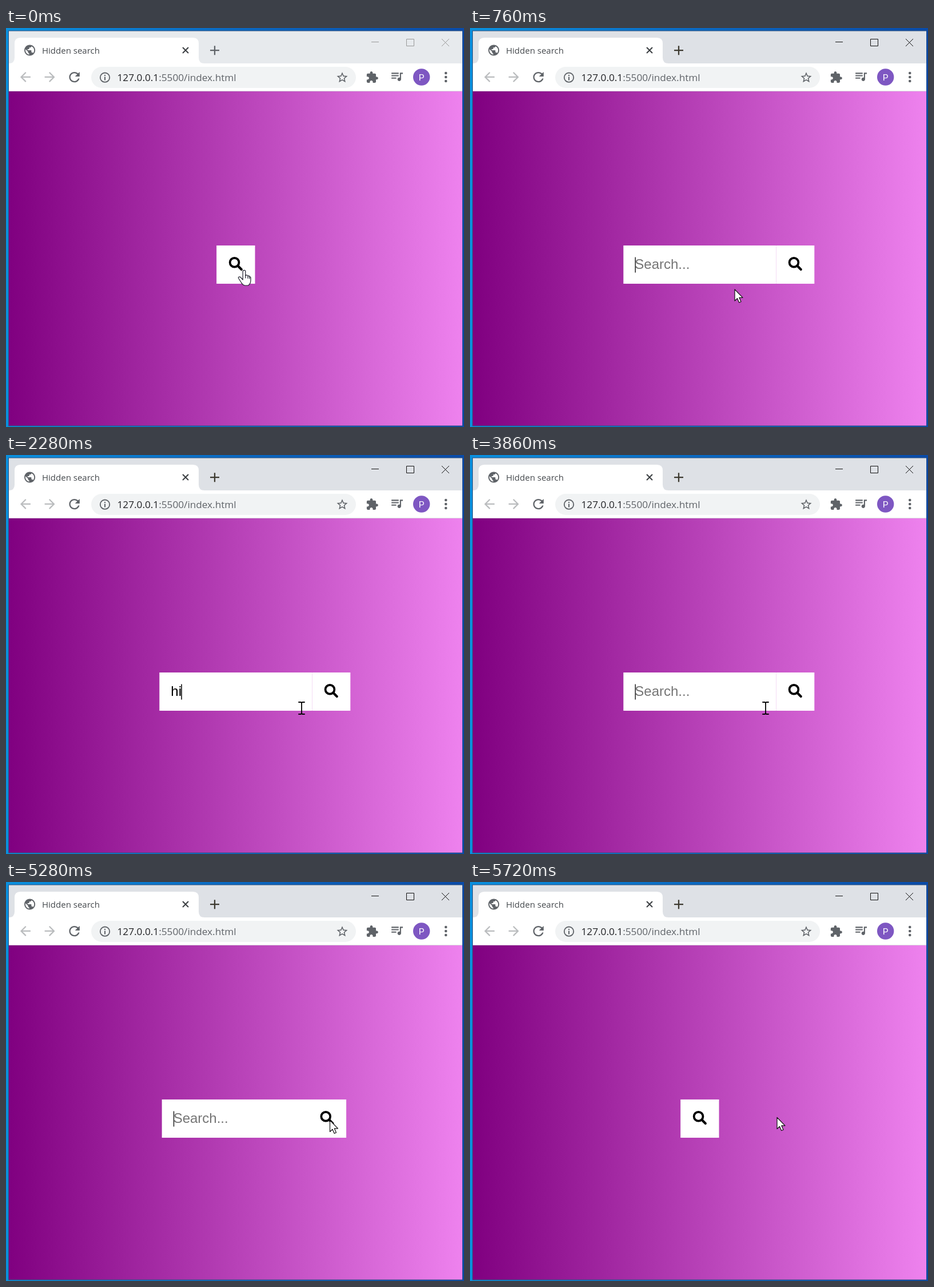
These frames come from a looping animation (801 px wide and 699 px high, 5.77 s). An HTML page:

```html
<!DOCTYPE html>
<html lang="en">
<head>
<meta charset="utf-8">
<title>Hidden search</title>
<style>
  html, body { margin: 0; width: 100%; height: 100%; overflow: hidden; }
  #stage { display: block; width: 100%; height: 100%; --strip: #dee1e6; --control: #111; --plus: #3d3a30; }
  #stage.idle { --strip: #e7eaed; --control: #999; --plus: #5f6368; }
  .ui { font-family: "Open Sans", "Noto Sans", sans-serif; }
  .icon { fill: #5f6368; }
  .dim { fill: #babcbe; }
  .line { fill: none; }
  #field text { font: 24px "Liberation Sans", Arial, sans-serif; white-space: pre; }
  #cursor path { stroke-linejoin: round; stroke-linecap: round; }
</style>
</head>
<body>
<svg id="stage" viewBox="0 0 801 699" preserveAspectRatio="none">
  <defs>
    <linearGradient id="page"><stop stop-color="#800080"/><stop offset="1" stop-color="#ee82ee"/></linearGradient>
    <linearGradient id="desktop"><stop stop-color="#0a90de"/><stop offset=".5" stop-color="#0b68c0"/><stop offset="1" stop-color="#0a4ba8"/></linearGradient>
  </defs>

  <!-- desktop and window -->
  <rect width="801" height="699" fill="url(#desktop)"/>
  <rect x="4" y="4.5" width="794.5" height="693" fill="#31517c"/>
  <rect x="5" y="5.5" width="793" height="57" fill="var(--strip)"/>
  <rect x="5" y="62" width="793" height="49" fill="#fff"/>
  <rect x="5" y="110" width="793" height="1" fill="#dcdee0"/>
  <rect x="5" y="111" width="793" height="585.5" fill="url(#page)"/>

  <!-- tab strip -->
  <path d="M5 62Q15 62 15 52V27Q15 17 25 17H327Q337 17 337 27V52Q337 62 347 62Z" fill="#fff"/>
  <path class="icon" transform="translate(30.2 27.6) scale(.95)" d="M12 2C6.48 2 2 6.48 2 12s4.48 10 10 10 10-4.48 10-10S17.52 2 12 2zm-1 17.93c-3.95-.49-7-3.85-7-7.93 0-.62.08-1.21.21-1.79L9 15v1c0 1.1.9 2 2 2v1.93zm6.9-2.54c-.26-.81-1-1.39-1.9-1.39h-1v-3c0-.55-.45-1-1-1H8v-2h2c.55 0 1-.45 1-1V7h2c1.1 0 2-.9 2-2v-.41c2.93 1.19 5 4.06 5 7.41 0 2.08-.8 3.97-2.1 5.39z"/>
  <text class="ui" x="63" y="45" font-size="15" fill="#45494d">Hidden search</text>
  <path class="line" d="M309 34l10 10m0-10l-10 10" stroke="#3c4043" stroke-width="2"/>
  <path class="line" d="M357 39.2h16m-8-8v16" stroke="var(--plus)" stroke-width="2.3"/>
  <path class="line" d="M639 24.5h13M700.5 19.5h13v12h-13zM762 19l13 13m0-13l-13 13" stroke="var(--control)"/>

  <!-- toolbar -->
  <path id="arrowLeft" class="dim" transform="translate(20.5 72.5) scale(1.12)" d="M20 11H7.83l5.59-5.59L12 4l-8 8 8 8 1.41-1.41L7.83 13H20v-2z"/>
  <use href="#arrowLeft" transform="translate(110.5 0) scale(-1 1)"/>
  <path class="icon" transform="translate(105.8 72.3) scale(1.15)" d="M17.65 6.35C16.2 4.9 14.21 4 12 4c-4.42 0-7.99 3.58-7.99 8s3.57 8 7.99 8c3.73 0 6.84-2.55 7.73-6h-2.08c-.82 2.33-3.04 4-5.65 4-3.31 0-6-2.69-6-6s2.69-6 6-6c1.66 0 3.14.69 4.22 1.78L13 11h7V4l-2.35 2.35z"/>
  <rect x="149" y="68" width="463" height="37" rx="18.5" fill="#f1f3f4"/>
  <circle class="line" cx="173" cy="86.7" r="8.2" stroke="#5f6368" stroke-width="1.8"/>
  <path class="line" d="M173 85.5v6m0-9.6v2" stroke="#5f6368" stroke-width="2"/>
  <text class="ui" x="194.5" y="93" font-size="17.2" fill="#202124">127.0.0.1<tspan fill="#5f6368">:5500/index.html</tspan></text>
  <path class="icon" transform="translate(576.6 75.3) scale(.95)" d="M22 9.24l-7.19-.62L12 2 9.19 8.63 2 9.24l5.46 4.73L5.82 21 12 17.27 18.18 21l-1.63-7.03L22 9.24zM12 15.4l-3.76 2.27 1-4.28-3.32-2.88 4.38-.38L12 6.1l1.71 4.04 4.38.38-3.32 2.88 1 4.28L12 15.4z"/>
  <path class="icon" transform="translate(629 75) scale(.95)" d="M20.5 11H19V7c0-1.1-.9-2-2-2h-4V3.5C13 2.12 11.88 1 10.5 1S8 2.12 8 3.5V5H4c-1.1 0-1.99.9-1.99 2v3.8H3.5c1.49 0 2.7 1.21 2.7 2.7s-1.21 2.7-2.7 2.7H2V20c0 1.1.9 2 2 2h3.8v-1.5c0-1.49 1.21-2.7 2.7-2.7 1.49 0 2.7 1.21 2.7 2.7V22H17c1.1 0 2-.9 2-2v-4h1.5c1.38 0 2.5-1.12 2.5-2.5S21.88 11 20.5 11z"/>
  <path class="icon" transform="translate(671 72) scale(1.05)" d="M15 6H3v2h12V6zm0 4H3v2h12v-2zM3 16h8v-2H3v2zM17 6v8.18c-.31-.11-.65-.18-1-.18-1.66 0-3 1.34-3 3s1.34 3 3 3 3-1.34 3-3V8h3V6h-5z"/>
  <circle cx="726.7" cy="86" r="14.7" fill="#7e57c2"/>
  <text x="726.7" y="91.5" font-family="Roboto, sans-serif" font-size="15.5" fill="#fff" text-anchor="middle">P</text>
  <g class="icon"><circle cx="769.3" cy="79" r="2.3"/><circle cx="769.3" cy="86" r="2.3"/><circle cx="769.3" cy="93" r="2.3"/></g>

  <!-- search box -->
  <rect id="box" y="381" height="67" fill="#fff"/>
  <svg id="field" y="381" height="67">
    <text id="value" y="41"></text>
    <rect id="caret" y="20.5" width="1.5" height="27"/>
  </svg>
  <g id="button">
    <rect y="381" width="67" height="67" fill="#fff"/>
    <g transform="translate(21.4 401)" fill="none" stroke="#000">
      <circle cx="9.75" cy="9.75" r="7.9" stroke-width="3.75"/>
      <path d="M15.8 15.8L22 22" stroke-width="4.2" stroke-linecap="round"/>
    </g>
  </g>

  <g id="cursor">
    <g id="hand" stroke="#1c1c28" stroke-width="1.2">
      <path fill="#fff" d="M-2.3 2.5Q-2 .3 0 .3Q2.3 .3 2.3 2.5V9.5Q6 8 6.5 10.5Q9.5 9.5 9.5 12Q11.5 11.5 11.5 13.5V18Q11.5 24 7 27H1Q-3 26-5 22L-9.5 15Q-11 12.5-9 12Q-7 11.5-5 14L-2.3 17Z"/>
      <path fill="none" d="M2.3 9.5V14M6.5 10.5V14.5M9.5 12V15"/>
    </g>
    <path id="arrow" fill="#fff" stroke="#111" stroke-width="1.2" d="M.5 .5V20.5L5 16.2L8.2 23.5L11.5 22L8.3 14.8H14.5Z"/>
    <path id="beam" fill="none" stroke="#000" stroke-width="1.8" d="M-5-10.5H-2Q0-10.5 0-8.5Q0-10.5 2-10.5H5M0-8.5V8.5M-5 10.5H-2Q0 10.5 0 8.5Q0 10.5 2 10.5H5"/>
  </g>
</svg>
<script>
const LOOP = 5770, TICK = 50;
const CENTER = 401.8, CLOSED = 66.8, GROWTH = 200.2, SHIFT = 267, PAD = 20;
const FONT_SIZE = 24, ADVANCE = { h: .556, i: .222, ' ': .278 };

// Spans in which the screen refreshes in ticks.
const BURSTS = [[280, 560], [710, 1270], [4340, 4870], [5280, 5560]];

// time, x, y, shape
const POINTER = [
  [0, 416.5, 424, 'hand'], [330, 416.5, 424, 'beam'], [660, 416.5, 424, 'beam'],
  [710, 432, 437, 'beam'], [760, 462.5, 457.5, 'arrow'], [860, 490, 461, 'arrow'],
  [1010, 515, 457, 'arrow'], [1110, 524, 449, 'arrow'], [1160, 524, 445, 'beam'],
  [1270, 523, 443, 'beam'], [1350, 517, 443.5, 'beam'], [4290, 517, 443.5, 'beam'],
  [4440, 537, 434, 'hand'], [4540, 549, 432, 'hand'], [4640, 553, 428, 'hand'],
  [4740, 558, 419, 'hand'], [4870, 566, 407, 'hand'], [5050, 569, 406, 'hand'],
  [5270, 569, 406, 'hand'], [5280, 566, 417, 'arrow'], [5719, 566, 417, 'arrow'],
  [5720, 536.5, 412, 'arrow']
];

// time, typed text, caret shown
const INPUT = [
  [0, '', 0], [280, '', 1], [810, '', 0], [1300, '', 1], [1860, '', 0],
  [1990, 'h', 1], [2280, 'hi', 1], [2760, 'hi', 0], [2840, 'hi ', 1],
  [3320, 'hi ', 0], [3350, 'hi', 1], [3860, '', 1], [4320, '', 0],
  [4820, '', 1], [5050, '', 0], [5280, '', 1]
];

const $ = id => document.getElementById(id);
const set = (id, attrs) => { for (const k in attrs) $(id).setAttribute(k, attrs[k]); };
const clamp = v => Math.min(1, Math.max(0, v));
const indexAt = (rows, t) => rows.findLastIndex(row => row[0] <= t);

function snap(t) {
  const burst = BURSTS.find(([start, end]) => t >= start && t < end);
  return burst ? burst[0] + Math.floor((t - burst[0]) / TICK) * TICK : t;
}

// CSS "ease": cubic-bezier(.25, .1, .25, 1)
function ease(x) {
  if (x <= 0 || x >= 1) return clamp(x);
  let lo = 0, hi = 1, u;
  for (let i = 0; i < 24; i++) {
    u = (lo + hi) / 2;
    if (.75 * u * (1 - u) + u ** 3 < x) lo = u; else hi = u;
  }
  return .3 * u * (1 - u) ** 2 + 3 * (1 - u) * u * u + u ** 3;
}

function drawBox(t) {
  const open = ease((t - 262) / 298) - ease((t - 5262) / 298);
  const width = CLOSED + GROWTH * open;
  const left = CENTER - width / 2;
  const [, text, caret] = INPUT[indexAt(INPUT, t)];
  const end = [...text].reduce((sum, c) => sum + ADVANCE[c] * FONT_SIZE, 0);
  set('box', { x: left, width });
  set('field', { x: left + PAD, width: width - 2 * PAD });
  set('value', { fill: text ? '#000' : '#757575' });
  $('value').textContent = text || 'Search...';
  set('caret', { x: Math.max(0, end - .7), visibility: caret ? 'visible' : 'hidden' });
  set('button', { transform: `translate(${left + SHIFT * open} 0)` });
}

function drawPointer(t) {
  const i = indexAt(POINTER, t);
  const [t0, x0, y0, shape] = POINTER[i];
  const [t1, x1, y1] = POINTER[i + 1] || [LOOP, x0, y0];
  const k = clamp((t - t0) / (t1 - t0));
  set('cursor', { transform: `translate(${x0 + (x1 - x0) * k} ${y0 + (y1 - y0) * k})` });
  for (const id of ['hand', 'arrow', 'beam']) set(id, { display: id === shape ? 'inline' : 'none' });
}

const begin = performance.now();
function frame() {
  const t = snap((performance.now() - begin) % LOOP);
  $('stage').classList.toggle('idle', t < 100);
  drawBox(t);
  drawPointer(t);
  requestAnimationFrame(frame);
}
frame();
</script>
</body>
</html>
```
